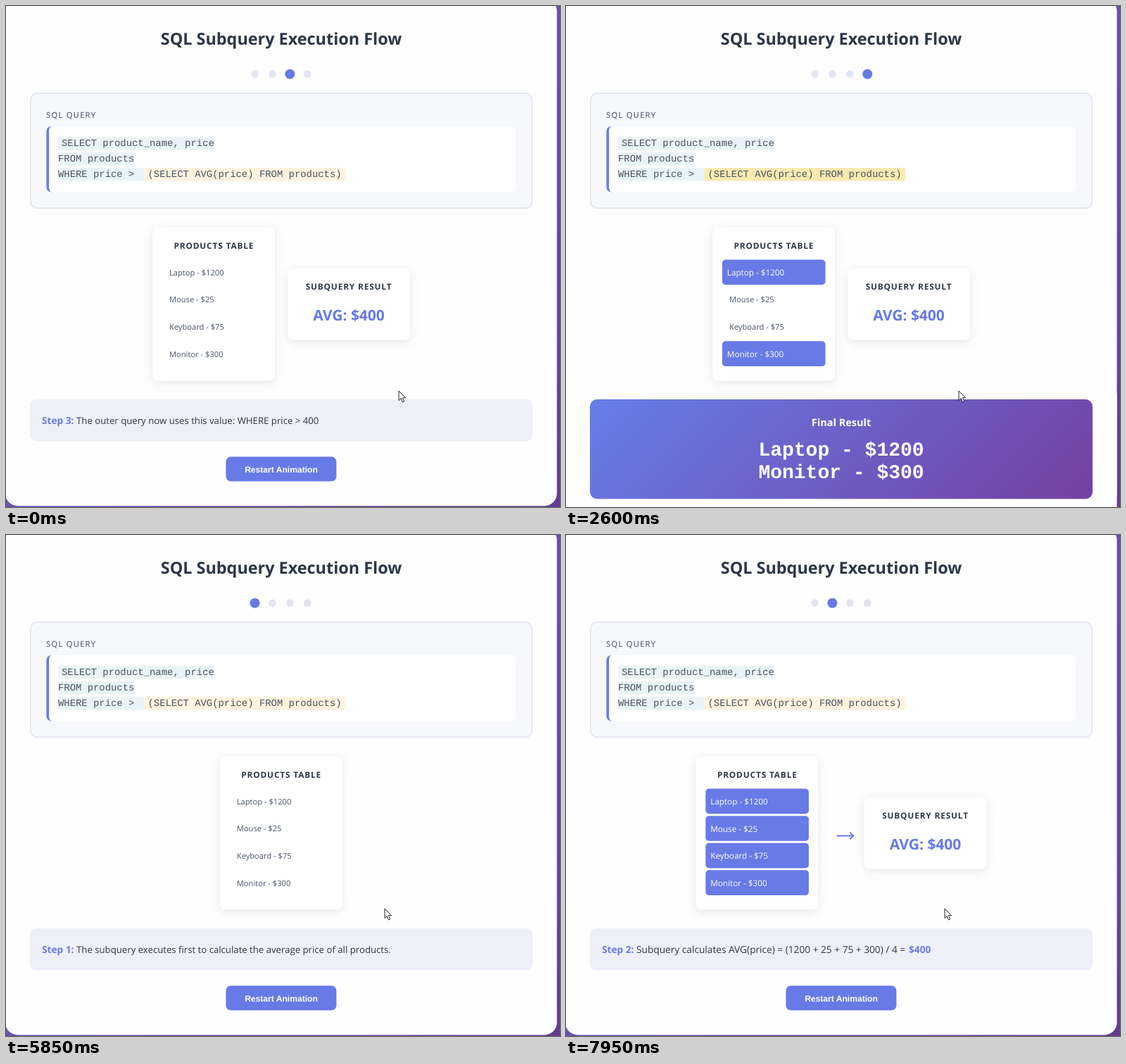
An HTML page that plays this animation: 787x712 px, repeating every 8 s.

```html
<!DOCTYPE html>
<html lang="en">
<head>
<meta charset="utf-8">
<title>SQL Subquery Execution Flow</title>
<style>
@property --on { syntax: "<number>"; inherits: true; initial-value: 0; }

html, body { margin: 0; width: 100%; height: 100%; overflow: hidden; }
svg { display: block; width: 787px; height: 712px; --accent: #677ae6; --ink: #2d3748; }
text { font: 13.2px "Open Sans", "Noto Sans", sans-serif; fill: var(--ink); text-rendering: geometricPrecision; }
.bold { font-weight: 700; }
.accent { fill: var(--accent); }
.mid { text-anchor: middle; }
.title { font-size: 23.4px; }
.label { font-size: 11.6px; font-weight: 600; letter-spacing: .9px; fill: #6b778c; }
.head { font-size: 11.8px; letter-spacing: .88px; }
.avg { font-size: 21px; }
.step { font-size: 13.7px; }
.code { font: 13.9px "Liberation Mono", monospace; fill: #4a5260; }
.button { font: bold 12.1px "Liberation Sans", sans-serif; fill: #fff; }
.final text { font-size: 14.5px; fill: #fff; }
.final .rows { font: bold 28px "Liberation Mono", monospace; }
.query { fill: #e8f4f8; }
.panel { fill: #fff; filter: drop-shadow(0 3.5px 6.5px rgba(0, 0, 0, .1)); }

/* one step lasts 3 s, its transitions 0.3 s, the loop 8 s */
.dot, .row { animation: 8s infinite ease; }
.dot .lit { fill: var(--accent); opacity: var(--on); }
.dot { transform-box: fill-box; transform-origin: center; transform: scale(calc(1 + .3 * var(--on))); }
.row { transform-origin: 295.2px var(--y); transform: scale(calc(1 + .05 * var(--on))); }
.row rect { fill: var(--accent); opacity: var(--on); }
.row text {
  font-size: 11.15px;
  fill: rgb(calc(74 + 181 * var(--on)), calc(85 + 170 * var(--on)), calc(104 + 151 * var(--on)));
}
.d1 { animation-name: on-step1; }
.d2, .all { animation-name: on-step2; }
.d3 { animation-name: on-step3; }
.d4 { animation-name: on-step4; }
.match { animation-name: on-match; }
@keyframes on-step1 { 0%, 50.125% { --on: 0 } 53.875%, 87.625% { --on: 1 } 91.375%, 100% { --on: 0 } }
@keyframes on-step2 { 0%, 87.625% { --on: 0 } 91.375%, 100% { --on: 1 } }
@keyframes on-step3 { 0%, 12.625% { --on: 1 } 16.375%, 100% { --on: 0 } }
@keyframes on-step4 { 0%, 12.625% { --on: 0 } 16.375%, 50.125% { --on: 1 } 53.875%, 100% { --on: 0 } }
@keyframes on-match {
  0%, 12.625% { --on: 0 } 16.375%, 50.125% { --on: 1 }
  53.875%, 87.625% { --on: 0 } 91.375%, 100% { --on: 1 }
}

.show1, .show2, .show3, .final, .products, .result { animation: 8s infinite step-end; }
.show1 { animation-name: show1; }
.show2 { animation-name: show2; }
.show3 { animation-name: show3; }
.final { animation-name: show4; }
.products { animation-name: products; }
.result { animation-name: result; }
@keyframes show1 { 0% { opacity: 0 } 50.125% { opacity: 1 } 87.625%, 100% { opacity: 0 } }
@keyframes show2 { 0% { opacity: 0 } 87.625%, 100% { opacity: 1 } }
@keyframes show3 { 0% { opacity: 1 } 12.625%, 100% { opacity: 0 } }
@keyframes show4 { 0% { opacity: 0 } 12.625% { opacity: 1 } 50.125%, 100% { opacity: 0 } }
@keyframes products {
  0% { transform: none } 50.125% { transform: translateX(95.8px) }
  87.625%, 100% { transform: translateX(-23.6px) }
}
@keyframes result {
  0% { opacity: 1; transform: none } 50.125% { opacity: 0; transform: none }
  87.625%, 100% { opacity: 1; transform: translateX(23.5px) }
}

.sub { fill: #fff3e0; animation: pulse 2s -1.9s infinite ease; }
@keyframes pulse { 50% { fill: #f9e8a4 } }

.arrow { fill: none; stroke: var(--accent); stroke-width: 1.8; animation: nudge 8s infinite ease; }
@keyframes nudge {
  0%, 87.625% { transform: none }
  97% { transform: translateX(8.8px); animation-timing-function: linear }
  100% { transform: translateX(4px) }
}

.cursor { fill: #fff; stroke: #222; stroke-width: 1; animation: cursor 8s infinite ease-in-out; }
@keyframes cursor {
  0%, 50.5% { transform: translate(558px, 547px) }
  54%, 100% { transform: translate(538px, 531px) }
}
</style>
</head>
<body>
<svg viewBox="0 0 787 712">
  <defs>
    <linearGradient id="page" gradientUnits="userSpaceOnUse" x1="20" y1="-20" x2="767" y2="732">
      <stop offset="0" stop-color="#6272d8"/>
      <stop offset=".5" stop-color="#6a50b0"/>
      <stop offset="1" stop-color="#633c90"/>
    </linearGradient>
    <linearGradient id="answer" gradientUnits="userSpaceOnUse" x1="177" y1="415.5" x2="605" y2="843.5">
      <stop offset="0" stop-color="#667eea"/>
      <stop offset="1" stop-color="#7440a0"/>
    </linearGradient>
  </defs>

  <rect width="787" height="712" fill="url(#page)"/>
  <rect x="-1" y="-10" width="783.6" height="720.4" rx="17.6" fill="#fefefe"/>
  <text class="title bold mid" x="391" y="55">SQL Subquery Execution Flow</text>
  <g id="dots"></g>

  <rect x="34.9" y="123.9" width="712.2" height="163.4" rx="9.5" fill="#f7f8fc" stroke="#e2e6f0" stroke-width="1.8"/>
  <text class="label" x="57" y="159">SQL QUERY</text>
  <rect x="57.4" y="171" width="14" height="93.5" rx="7" class="accent"/>
  <path fill="#fff" d="M61.1 178a3.5 7 0 0 1 3.5-7H717a7 7 0 0 1 7 7V257.5a7 7 0 0 1-7 7H64.6a3.5 7 0 0 1-3.5-7Z"/>
  <rect class="query" x="74" y="186" width="223" height="18.5" rx="2"/>
  <rect class="query" x="74" y="208" width="108.5" height="18.5"/>
  <rect class="query" x="74" y="230" width="122" height="18.5" rx="2"/>
  <rect class="sub" x="196" y="230" width="286" height="18.7" rx="3"/>
  <text class="code" x="79" y="199">SELECT product_name, price</text>
  <text class="code" x="74" y="221">FROM products</text>
  <text class="code" x="74" y="243">WHERE price &gt;</text>
  <text class="code" x="201.5" y="243">(SELECT AVG(price) FROM products)</text>

  <g class="products">
    <rect class="panel" x="208" y="314.5" width="174" height="218" rx="8"/>
    <text class="head bold mid" x="295.4" y="345">PRODUCTS TABLE</text>
    <g id="rows"></g>
  </g>
  <g class="result">
    <rect class="panel" x="400" y="373" width="174" height="101.5" rx="8"/>
    <text class="head bold mid" x="487" y="403">SUBQUERY RESULT</text>
    <text class="avg bold accent mid" x="487" y="447">AVG: $400</text>
  </g>
  <g class="show2"><path class="arrow" d="M379.5 427.5H403M398.3 422.5L403.3 427.5L398.3 432.5"/></g>

  <rect x="34" y="559" width="714" height="59.5" rx="9" fill="#edf0f8"/>
  <g class="show1">
    <text class="step bold accent" x="51" y="594">Step 1:</text>
    <text x="100" y="594">The subquery executes first to calculate the average price of all products.</text>
  </g>
  <g class="show2">
    <text class="step bold accent" x="51" y="594">Step 2:</text>
    <text class="step" x="100" y="594">Subquery calculates AVG(price) = (1200 + 25 + 75 + 300) / 4 =</text>
    <text class="step bold accent" x="487" y="594">$400</text>
  </g>
  <g class="show3">
    <text class="step bold accent" x="51" y="594">Step 3:</text>
    <text x="100" y="594">The outer query now uses this value: WHERE price &gt; 400</text>
  </g>
  <rect x="312.4" y="640.6" width="157" height="35" rx="7" class="accent"/>
  <text class="button mid" x="391" y="662.5">Restart Animation</text>

  <g class="final">
    <rect x="-1" y="550" width="783.6" height="170" fill="#fefefe"/>
    <rect x="34" y="559" width="714" height="141.5" rx="10" fill="url(#answer)"/>
    <text class="bold mid" x="391" y="597">Final Result</text>
    <text class="rows mid" x="391" y="638.5">Laptop - $1200</text>
    <text class="rows mid" x="391" y="671">Monitor - $300</text>
  </g>

  <path class="cursor" d="M0 0V13.6L3.2 10.7L5.4 16L7.7 15L5.5 9.8H9.6Z"/>
</svg>
<script>
const fill = (id, list, draw) => { document.getElementById(id).innerHTML = list.map(draw).join(""); };

fill("dots", [1, 2, 3, 4], (step, i) => {
  const circle = `cx="${353.5 + 24.9 * i}" cy="96.7" r="5.4"`;
  return `<g class="dot d${step}"><circle ${circle} fill="#e3e6f0"/><circle ${circle} class="lit"/></g>`;
});

const products = [["Laptop", 1200], ["Mouse", 25], ["Keyboard", 75], ["Monitor", 300]];
fill("rows", products, ([name, price], i) => {
  const y = 378.4 + 38.6 * i;
  return `<g class="row ${price >= 300 ? "match" : "all"}" style="--y:${y}px">
    <rect x="225.4" y="${y - 17}" width="139.6" height="34" rx="4.5"/>
    <text x="232" y="${y + 4.4}">${name} - $${price}</text></g>`;
});
</script>
</body>
</html>
```
